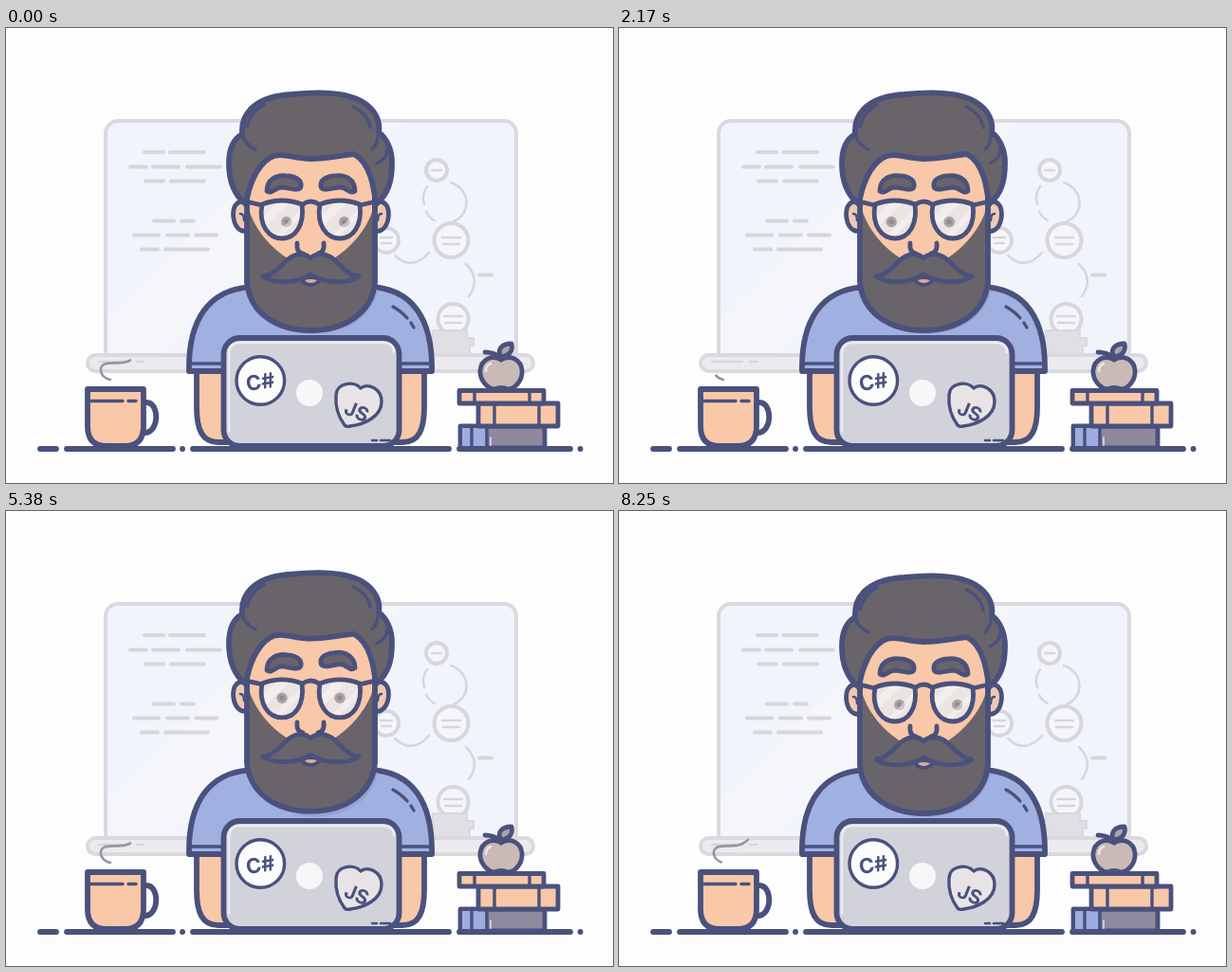
Write an HTML page that moves like this. It is 640 by 480 pixels and loops after 8.33 s.

```html
<!DOCTYPE html>
<html lang="en">
<head>
<meta charset="utf-8">
<title>Developer at a desk</title>
<style>
html, body { margin: 0; width: 100%; height: 100%; overflow: hidden; background: #fdfdfd; }
svg { display: block; width: 100vw; height: 100vh; }
path, rect, circle { stroke-linecap: round; stroke-linejoin: round; }
.ink { stroke: #4a517c; stroke-width: 5.8; }
.line { fill: none; }
.mid { stroke-width: 4.8; }
.thin { stroke-width: 3.4; }
.hair { fill: #69646a; }
.skin { fill: #f8c8a8; }
.shirt { fill: #a0b0e1; }
.chalk { fill: none; stroke: #d7d6dc; stroke-width: 4; }
.node { fill: #f4f6fa; }
.mark { stroke-width: 2.5; }
.steam { fill: none; stroke: #99949d; stroke-width: 2.6; }
text { font-family: Inter, "Open Sans", sans-serif; font-weight: 700; fill: #4a517c; text-anchor: middle; }
</style>
</head>
<body>
<svg viewBox="0 0 640 480">
  <defs>
    <path id="lens" d="M270 186Q291 178 312 186C315 208 305 222 291 222C277 222 266 208 270 186Z"/>
    <path id="brow" d="M275 172C275 160 285 154 297 156C307 157 312 161 311 167C310 173 299 169 291 168C284 168 281 176 275 172Z"/>
    <clipPath id="lenses">
      <use href="#lens"/>
      <use href="#lens" x="61"/>
    </clipPath>
  </defs>

  <g id="board">
    <rect x="105" y="98" width="433" height="254" rx="13" fill="#f1f4fa" stroke="#d9d9df" stroke-width="4"/>
    <path d="M107 306L314 100H420L166 345H107Z" fill="#f4f6fa"/>
    <path class="chalk" d="M146 131h20m7 0h36M131 146.500h17m7 0h27m9 0h35M147 161.500h19m8 0h35M156 203.500h21m8 0h13M135 218.500h26m9 0h22m8 0h22M143 233.500h17m8 0h45"/>
    <path class="chalk mark" d="M469 163C491 171 490 197 472 204M444 167Q438 176 441 186M443 194Q447 201 452 203M410 240Q428 257 446 237M485 249Q501 265 488 283"/>
    <path class="chalk" d="M499 260.500h13"/>
    <circle class="chalk node" cx="454" cy="150" r="11"/>
    <circle class="chalk node" cx="401" cy="224" r="13"/>
    <circle class="chalk node" cx="469.500" cy="224" r="18"/>
    <circle class="chalk node" cx="471.500" cy="307" r="16"/>
    <path class="chalk mark" d="M449 150h10M395 221h12m-11 6h10M460 221h19m-18 7h17M462 304h19m-18 7h17"/>
    <path d="M450 319h36v8h7v8h-4v10h-42v-18h3Z" fill="#e1dfe3" stroke="#d9d7dc" stroke-width="2"/>
    <rect x="86" y="345" width="470" height="17" rx="8.500" fill="#ebebef" stroke="#d9d9df" stroke-width="4"/>
    <path class="chalk mark" d="M98 352h32m8 0h7"/>
  </g>

  <path class="steam"/>
  <path class="steam"/>

  <g id="body">
    <path class="skin ink" d="M201 360V400C201 424 207 437 224 437H250V360ZM441 360V400C441 424 435 437 418 437H395V360Z"/>
    <path class="shirt ink" d="M193 362C192 309 213 274 262 273H382C430 274 450 309 449 362H410V430H232V362Z"/>
    <path class="ink line thin" d="M195 354H230M412 354H447"/>
    <path class="ink line thin" d="M408 294Q417 299 423 306M427 311L430 316"/>
    <path d="M300 320C352 330 386 308 392 276H380L321 318Z" fill="#94a2d0"/>
  </g>

  <g id="head">
    <g id="ears">
      <path class="ink mid" fill="#efcab3" d="M257 185C244 179 238 188 240 201C242 213 251 218 258 211ZM386 185C399 179 405 188 403 201C401 213 392 218 385 211Z"/>
      <path class="ink line mark" d="M247 196Q251 196 251 203M396 196Q392 196 392 203"/>
    </g>
    <path id="beard" class="hair ink" d="M254 180V268C257 301 286 319 321 319C357 319 386 301 389 268V180Z"/>
    <path id="skin" class="skin" d="M257 194V125H386V194C380 212 364 232 344 244H299C278 232 263 212 257 194Z"/>
    <g id="hair">
      <path class="hair ink" d="M253 186C239 175 235 159 235 143C235 128 240 117 249 112C247 87 267 72 301 70C330 67 360 68 376 78C389 86 395 98 393 110C401 116 407 128 407 142C407 162 403 175 390 186C388 170 385 143 367 133C354 134 339 138 321 138C304 138 290 130 278 137C264 146 256 166 253 186Z"/>
      <path class="ink line thin" d="M249 113Q252 123 263 128M392 111Q393 121 386 128M366 83Q382 91 384 105M402 127Q402 138 391 143M254 104Q258 88 272 81"/>
    </g>
    <g id="face">
      <use href="#brow" class="ink mid" fill="#69646a"/>
      <g id="rightBrow"><use href="#brow" class="ink mid" fill="#69646a" transform="matrix(-1 0 0 1 643 0)"/></g>
      <g clip-path="url(#lenses)">
        <path d="M260 174H382V226H260Z" fill="#ebe4e2"/>
        <g id="eyes">
          <circle cx="291" cy="204.500" r="5.700" fill="#aaa3a7"/>
          <circle cx="352" cy="204.500" r="5.700" fill="#aaa3a7"/>
          <circle cx="291" cy="204.500" r="2.700" fill="#928b93"/>
          <circle cx="352" cy="204.500" r="2.700" fill="#928b93"/>
        </g>
        <path d="M259 211L293 177h13L264 219ZM279 223L321 181v8L286 224ZM320 211L354 177h13L325 219ZM340 223L382 181v8L347 224Z" fill="#fff" opacity=".36"/>
      </g>
      <use href="#lens" class="ink line mid"/>
      <use href="#lens" class="ink line mid" x="61"/>
      <path class="ink line mid" d="M313 186Q321 180 330 186M270 187L253 183M373 187L390 183"/>
      <path class="ink line mid" d="M307 227Q306 237 313 238M335 227Q336 237 329 238"/>
    </g>
    <g id="mouth">
      <path d="M308 262H335Q331 273 321 273Q312 273 308 262Z" fill="#4a4d74"/>
      <path d="M315 266Q321 264 328 266Q326 269 321 269Q317 269 315 266Z" fill="#d9a99b"/>
      <path class="hair ink mid" d="M321 243C315 236 304 238 296 245C288 253 281 261 271 262C282 270 306 270 321 260C337 270 361 270 372 262C362 261 355 253 347 245C339 238 328 236 321 243Z"/>
    </g>
  </g>

  <path class="ink line" d="M36 444H53M64 444H176M186 444h.1M197 444H467M478 444H595M605.500 444h.1"/>

  <g id="laptop">
    <rect class="ink" x="229.500" y="327" width="185" height="114" rx="17" fill="#d2d2da"/>
    <path d="M235 425V345Q235 332 247 332H397Q409 332 409 342" fill="none" stroke="#ececf1" stroke-width="2.500"/>
    <path class="ink line mark" d="M386 435H391M395 435H405"/>
    <circle cx="320" cy="385" r="14" fill="#f7f7fa"/>
    <circle class="ink thin" cx="268.300" cy="372" r="25.300" fill="#fcfcfd"/>
    <text x="268" y="381" font-size="22" transform="rotate(-9 268 373)">C#</text>
    <path class="ink thin" fill="#e8e4e5" d="M374 380C367 372 349 374 348 387C347 399 351 411 357 419Q359 421 363 420C378 418 396 410 396 394C396 380 381 374 374 380Z"/>
    <text x="370" y="412" font-size="21" transform="rotate(22 370 404)">JS</text>
  </g>

  <g id="mug">
    <path class="ink line" d="M145 395H148C162 395 162 427 146 427H142"/>
    <path class="ink" fill="#f8c8a8" d="M86 381H145V420Q145 441 125 441H106Q86 441 86 420Z"/>
    <path class="ink line thin" d="M88 393.500H123M129 393.500H137"/>
  </g>

  <g id="books">
    <path class="ink mid" fill="#8e899c" d="M479 420H568V443H479Z"/>
    <path fill="#9eade0" d="M481 422H505V441H481Z"/>
    <path class="ink line thin" d="M491 421V442M507 421V442"/>
    <path d="M511 432V440" stroke="#c5cbea" stroke-width="2"/>
    <path class="ink mid" fill="#f8c8a8" d="M498 396H582V420H498Z"/>
    <path class="ink line thin" d="M515 398V419M562 398V419"/>
    <path class="ink mid" fill="#f8c8a8" d="M478 382.500H567V396H478Z"/>
    <path class="ink line thin" d="M494 383V395M552 383V395"/>
    <path class="ink mid" fill="#c9bab7" d="M522 350C512 344 501 350 500 361C499 371 508 381 515 381Q522 378 529 381C537 381 545 371 544 361C543 350 532 344 522 350Z"/>
    <path d="M506 362Q506 356 511 354" stroke="#eee6e4" stroke-width="2.500" fill="none"/>
    <path class="ink line mid" d="M522 350Q518 342 505 342"/>
    <path class="ink mid" fill="#aaa4ac" d="M522 347C517 339 523 333 533 333C535 341 530 346 522 347Z"/>
  </g>
</svg>
<script>
const LOOP = 8330, PUFF = 2690, PUFF_START = 2120;
const $ = id => document.getElementById(id);
const puffs = [...document.querySelectorAll('.steam')];
const curl = 'M110 371C100 369 97 359 103 355C110 351 120 356 130 351C142 345 148 330 143 317C139 305 123 300 112 308C103 315 102 326 109 335C114 340 121 340 128 336C136 331 136 318 128 315C123 314 120 317 121 320';
puffs.forEach(p => p.setAttribute('d', curl));
const length = puffs[0].getTotalLength();

// Each table lists [time, value] pairs.
const lift = [[0, 0], [4350, 0], [5850, 1], [6960, 1], [7920, 0]];
const gaze = [[0, 4.7], [300, 4.5], [2000, -3.8], [2250, -3.8], [3350, 0], [6900, 0], [7900, 4.8], [8330, 4.8]];
const front = [[0, 0], [70, 12], [570, 50], [750, 56], [1010, 90], [1490, 156], [1690, 172], [2400, 202], [2740, 211]];
const back = [[0, 0], [570, 0], [750, 2], [1010, 14], [1490, 87], [1690, 104], [2200, 173], [2740, 210], [2790, 211]];

const smooth = x => x * x * (3 - 2 * x);
const linear = x => x;

function sample(table, t, ease) {
  const i = table.findIndex(([at]) => at > t);
  if (i < 0) return table[table.length - 1][1];
  if (i === 0) return table[0][1];
  const [t0, a] = table[i - 1], [t1, b] = table[i];
  return a + (b - a) * ease((t - t0) / (t1 - t0));
}

const move = (id, x, y) => $(id).setAttribute('transform', `translate(${x} ${y})`);

function drawPuff(path, t) {
  const scale = length / 211;
  const a = sample(back, t, linear) * scale, b = sample(front, t, linear) * scale;
  path.style.visibility = b - a > 0.2 ? 'visible' : 'hidden';
  path.setAttribute('stroke-dasharray', `${b - a} ${length * 2}`);
  path.setAttribute('stroke-dashoffset', -a);
}

function draw(t) {
  const up = sample(lift, t, smooth);
  move('ears', 0, -4 * up);
  move('beard', 0, -3 * up);
  move('skin', 0, -4 * up);
  move('hair', 0, -4.3 * up);
  move('face', 0, -5.3 * up);
  move('rightBrow', 0, -3 * up);
  move('mouth', 0, -4 * up);
  move('eyes', sample(gaze, t, smooth), -4.2 * up);
  const age = (t - PUFF_START + PUFF) % PUFF;
  drawPuff(puffs[0], age);
  drawPuff(puffs[1], age + PUFF);
}

const start = performance.now();
function tick() {
  draw((performance.now() - start) % LOOP);
  requestAnimationFrame(tick);
}
tick();
</script>
</body>
</html>
```
